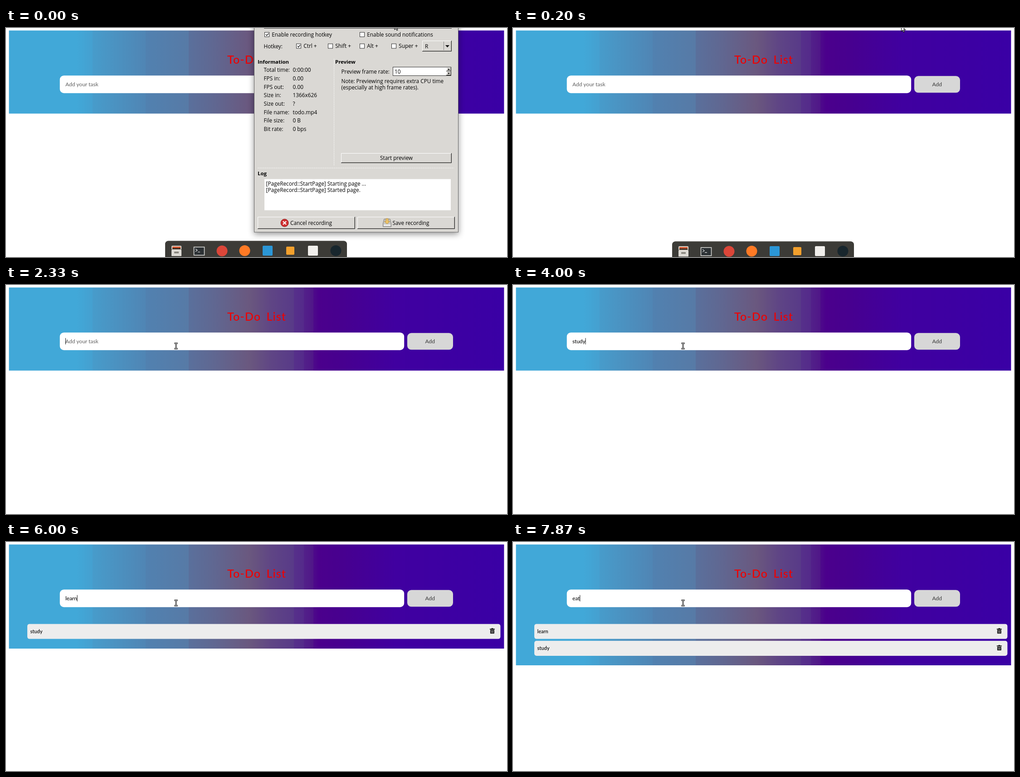
These frames come from a looping animation (1105x507 px, 8000 ms). An HTML page:

```html
<!DOCTYPE html>
<html lang="en">
<head>
<meta charset="utf-8">
<title>To-Do List</title>
<style>
  html, body { margin: 0; width: 100%; height: 100%; overflow: hidden; background: #fff; }
  svg { display: block; width: 1105px; height: 507px; }
  text { font: 500 12px Lato, sans-serif; white-space: pre; }
  .title { font-size: 25px; letter-spacing: 1.15px; word-spacing: 5px; fill: #f00000; }
  .hint { fill: #6c6c6c; }
  .typed { letter-spacing: -.15px; fill: #111; }
  .item text { font-size: 11px; font-weight: 600; fill: #111; }
  #dialog text { font: 500 11.8px "Open Sans", sans-serif; fill: #000; }
  #dialog .head { font-size: 11.4px; font-weight: 700; }
  #dialog .panel { filter: drop-shadow(0 4px 7px rgba(0, 0, 0, .42)); }
</style>
</head>
<body>
<svg id="stage" viewBox="0 0 1105 507"></svg>
<script>
const LOOP = 8000;
const STEP = 1000 / 15;
const stage = document.getElementById('stage');

// Markup helpers
const rect = (x, y, w, h, fill, extra = '') =>
  `<rect x="${x}" y="${y}" width="${w}" height="${h}" fill="${fill}" ${extra}/>`;
const circle = (x, y, r, fill, extra = '') =>
  `<circle cx="${x}" cy="${y}" r="${r}" fill="${fill}" ${extra}/>`;
const path = (d, stroke, width = 1, fill = 'none') =>
  `<path d="${d}" stroke="${stroke}" stroke-width="${width}" fill="${fill}"/>`;
const label = (x, y, s, cls = '', anchor = 'start') =>
  `<text x="${x}" y="${y}" class="${cls}" text-anchor="${anchor}">${s}</text>`;

// Background colours by x; a repeated x is a hard edge
const shades = [
  [6, '#41a8d8'], [155, '#41a8d8'], [190, '#45a0d0'], [190, '#479ccb'],
  [308, '#5085b4'], [308, '#5181b0'], [402, '#577aa6'], [402, '#5a709c'],
  [460, '#606791'], [535, '#6a587f'], [546, '#68547f'], [585, '#5f4585'],
  [635, '#583a88'], [635, '#56308a'], [657, '#542a8a'], [657, '#522189'],
  [678, '#501688'], [678, '#4d0a8a'], [690, '#4b008c'], [740, '#47008f'],
  [860, '#4000a0'], [1098, '#3a00a5']
];
const stops = shades.map(([x, c]) =>
  `<stop offset="${(x - 6) / 1092}" stop-color="${c}"/>`).join('');

const trash =
  rect(1067, 192, 11, 1.8, '#111') + rect(1070.5, 190.8, 4, 1.6, '#111') +
  rect(1068, 194.6, 9, 8.2, '#111', 'rx="1"') +
  path('M1070.2 196v5.4M1072.5 196v5.4M1074.8 196v5.4', '#ededed', .8);
const item = (id, name) =>
  `<g id="${id}" class="item">${rect(47, 181.4, 1043.5, 33.2, '#ededed', 'rx="5"')}` +
  `${label(53.5, 201.6, name)}<g class="bin">${trash}</g></g>`;

// Desktop widgets
const raised = (x, y, w, h) =>
  rect(x, y, w, h, '#dad8d4') +
  path(`M${x + .5} ${y + h - 1}V${y + .5}H${x + w - 1}`, '#fff') +
  path(`M${x} ${y + h - .5}H${x + w - .5}V${y}`, '#222') +
  path(`M${x + 1} ${y + h - 1.5}H${x + w - 1.5}V${y + 1}`, '#a09e9a');
const sunken = (x, y, w, h) =>
  rect(x + .5, y + .5, w - 1, h - 1, '#fff', 'stroke="#333"');
const check = (x, y, on, s) =>
  rect(x + .5, y - 4.5, 10, 10, '#fff', 'stroke="#333"') +
  (on ? path(`M${x + 3} ${y}l2 3 4 -5`, '#111', 1.3) : '') +
  label(x + 16.3, y + 4.5, s);

function dialog() {
  const info = [
    ['Total time:', '0:00:00'], ['FPS in:', '0.00'], ['FPS out:', '0.00'],
    ['Size in:', '1366x626'], ['Size out:', '?'], ['File name:', 'todo.mp4'],
    ['File size:', '0 B'], ['Bit rate:', '0 bps']
  ];
  const rows = info.map(([k, v], i) => {
    const y = 97.4 + i * 18.63;
    return label(568.5, y, k) + label(632.5, y, v);
  }).join('');
  return rect(547.5, -20, 450, 472, '#dad8d4', 'class="panel" stroke="#666"') +
    path('M569 .5H983', '#333') +
    check(570, 14, true, 'Enable recording hotkey') +
    check(780, 14, false, 'Enable sound notifications') +
    label(568.5, 44.5, 'Hotkey:') +
    check(640, 39.5, true, 'Ctrl +') + check(710, 39.5, false, 'Shift +') +
    check(780, 39.5, false, 'Alt +') + check(850, 39.5, false, 'Super +') +
    raised(918, 28, 65, 24) + label(924, 44.5, 'R') +
    path('M965.5 30V49', '#888') + path('M969 38h9l-4.5 5z', 'none', 0, '#111') +
    label(555, 78.5, 'Information', 'head') + rows +
    label(726, 78.5, 'Preview', 'head') +
    label(739.5, 100.5, 'Preview frame rate:') +
    sunken(853, 86, 129, 20) + label(857, 100.5, '10') +
    raised(971, 87, 11, 9) + raised(971, 96, 11, 9) +
    path('M974 93l2.5 -3.5 2.5 3.5zM974 99l2.5 3.5 2.5 -3.5z', 'none', 0, '#111') +
    label(739.5, 122.4, 'Note: Previewing requires extra CPU time') +
    label(739.5, 136.2, '(especially at high frame rates).') +
    `<g stroke-dasharray="3 1">${path('M723.5 68V305M555 310H988', '#f6f5f3')}</g>` +
    raised(739, 277, 244, 22) + label(861, 292.4, 'Start preview', '', 'middle') +
    label(555, 325.6, 'Log', 'head') +
    rect(570, 334.5, 411, 69, '#fff') +
    label(573.5, 349.4, '[PageRecord::StartPage] Starting page ...') +
    label(573.5, 363.2, '[PageRecord::StartPage] Started page.') +
    raised(555, 418, 215, 27) +
    circle(614.5, 431.5, 8.5, '#cf2f30', 'stroke="#8d1b1b"') +
    path('M611 428l7 7M618 428l-7 7', '#fff', 2.4) +
    label(627, 436, 'Cancel recording') +
    raised(775, 418, 215, 27) +
    path('M834 423H847L849.5 433V440H831.5V433Z', '#777', 1, '#c9c8c4') +
    path('M838 422h5v6h3.5l-6 6 -6 -6h3.5z', '#a97f2a', .8, '#f0c66a') +
    rect(833, 435, 15, 3, '#eee') +
    label(852.5, 436, 'Save recording');
}

function dock() {
  const tile = (x, fill, size = 22) =>
    rect(x - size / 2, 493 - size / 2, size, size, fill, 'rx="2"');
  return rect(351, 471.3, 401, 50, '#3c3b37', 'rx="7"') +
    path('M357 472H746', '#55534e') +
    rect(365, 482, 22, 9, '#d9d3c8', 'rx="2"') + rect(367, 484, 18, 3, '#d9542b') +
    rect(367, 487, 18, 3, '#3b2a20') + rect(365, 491, 22, 14, '#dedbd5', 'rx="1"') +
    rect(371, 495, 10, 4, '#8b8880') +
    rect(414.5, 485, 23, 18, '#2c3134', 'stroke="#d5d5d2" stroke-width="1.6"') +
    path('M418 489l4 3 -4 3M423 496h5', '#eee', 1.1) +
    circle(476.5, 493.5, 12, '#db4639') + circle(526.5, 493, 12, '#ff7a25') +
    tile(577, '#2b96d6') + tile(627, '#f2a02d', 18) + tile(677, '#f1efec') +
    circle(727.5, 493, 12, '#18262d');
}

stage.innerHTML =
  `<defs><linearGradient id="sky">${stops}</linearGradient></defs>` +
  rect(6.5, 5.5, 1092, 184, 'url(#sky)', 'id="back"') +
  label(488, 78.8, 'To-Do List', 'title') +
  rect(118.7, 105.2, 759.5, 39, '#fff', 'rx="9"') +
  rect(885, 106.3, 101, 37, '#d7d7d7', 'rx="9"') +
  `<g fill="#444">${label(935.3, 129, 'Add', '', 'middle')}</g>` +
  `<g id="hint">${label(131, 129, 'Add your task', 'hint')}</g>` +
  `<text id="typed" class="typed" x="131" y="129"></text>` +
  rect(0, 117.5, 1, 14, '#111', 'id="caret"') +
  item('learn', 'learn') + item('study', 'study') +
  `<g id="dialog">${dialog()}</g><g id="dock">${dock()}</g>` +
  `<g id="arrow">${path('M0 0V12.6L3 9.9 5 14.3 7 13.4 5 9.1H9Z', '#111', 1.1, '#fff')}</g>` +
  `<g id="beam">${path('M-3.5 -6H3.5M-3.5 6H3.5M0 -6V6', '#222', 3)}` +
  `${path('M-2.5 -6H2.5M-2.5 6H2.5M0 -6V6', '#ddd', 1)}</g>`;

const el = {};
stage.querySelectorAll('[id]').forEach(n => el[n.id] = n);
const show = (node, on) => { node.style.display = on ? '' : 'none'; };
const move = (node, x, y) => node.setAttribute('transform', `translate(${x} ${y})`);

// [time, field text, caret visible]
const typing = [
  [0, '', 0], [1200, '', 1], [1730, '', 0], [2330, '', 1],
  [2800, 's', 1], [3330, 'st', 1], [3600, 'stu', 1], [3870, 'stud', 1], [4000, 'study', 1],
  [4400, '', 1], [4930, '', 0],
  [5330, 'l', 1], [5470, 'le', 1], [5600, 'lea', 1], [5800, 'lear', 1], [6000, 'learn', 1],
  [6330, '', 1], [6800, 'e', 1], [7000, 'ea', 1], [7400, 'eat', 1]
];
// [time, x, y] of the pointer
const route = [
  [0, 857, -9], [70, 857, -9], [200, 856.5, -5], [400, 854, -2], [600, 800, 22],
  [866, 620, 68], [990, 620, 68], [1000, 374, 137], [1130, 374, 137], [1330, 375, 135]
];

function pointer(t) {
  const i = route.findIndex(p => p[0] > t);
  if (i < 0) return route[route.length - 1].slice(1);
  const [t0, x0, y0] = route[i - 1], [t1, x1, y1] = route[i];
  const k = (t - t0) / (t1 - t0);
  return [x0 + (x1 - x0) * k, y0 + (y1 - y0) * k];
}

let shown = null;
function render(t) {
  const tick = Math.floor((t + 4) / STEP) * STEP;

  const line = typing.filter(s => s[0] <= t).pop();
  if (line !== shown) {
    shown = line;
    el.typed.textContent = line[1];
    show(el.hint, !line[1]);
    show(el.caret, line[2]);
    el.caret.setAttribute('x', 131 + (line[1] ? el.typed.getComputedTextLength() : 0));
  }

  const count = (t >= 4400) + (t >= 6330);
  el.back.setAttribute('height', [184, 230.5, 267.5][count]);
  show(el.study, count > 0);
  show(el.learn, count > 1);
  move(el.study, 0, count > 1 ? 37.3 : 0);
  show(el.study.querySelector('.bin'), t >= 4470);
  show(el.learn.querySelector('.bin'), t >= 6400);

  show(el.dialog, t < 200);
  el.dialog.style.opacity = t < 70 ? 1 : t < 130 ? .5 : .15;
  const slide = Math.max(0, (tick - 130) / 400);
  show(el.dock, slide < 1.1);
  move(el.dock, 0, 36 * slide * slide);

  const overField = t >= 990;
  const [x, y] = pointer(overField ? Math.max(tick, 1000) : tick);
  show(el.arrow, !overField);
  show(el.beam, overField);
  move(overField ? el.beam : el.arrow, x, y);
}

function frame() {
  render(performance.now() % LOOP);
  requestAnimationFrame(frame);
}
frame();
</script>
</body>
</html>
```
